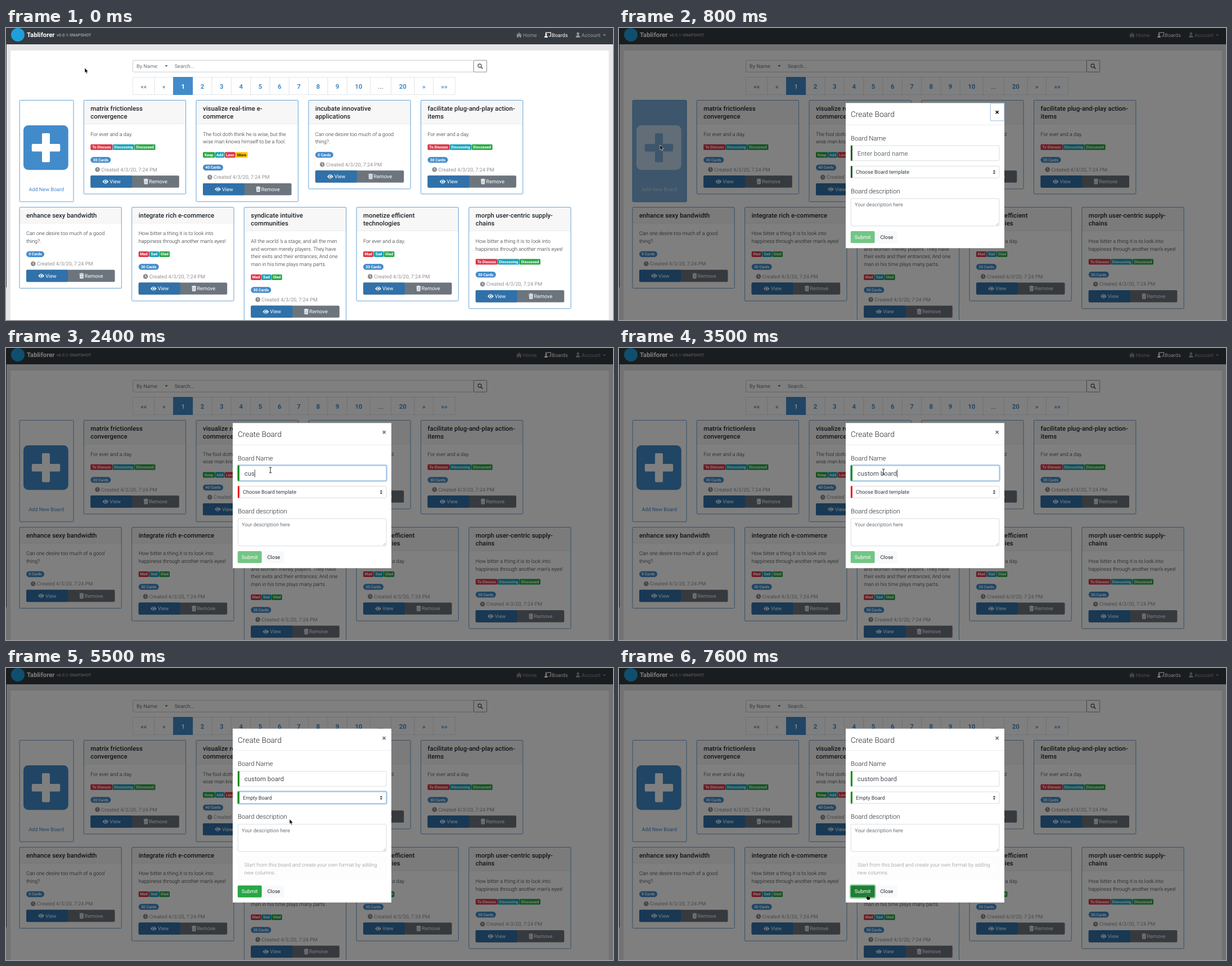
Animation, 1079 px wide and 519 px high, one loop 8000 ms. Source, as an HTML page:

```html
<!DOCTYPE html>
<html lang="en">
<head>
<meta charset="utf-8">
<title>Create a board</title>
<style>
  html, body { margin: 0; width: 100%; height: 100%; overflow: hidden; background: #e6e6e8; }
  svg { display: block; width: 1079px; height: 519px; }
  text { font-family: Roboto, sans-serif; white-space: pre; text-rendering: geometricPrecision; }
</style>
</head>
<body>
<svg viewBox="0 0 1079 519"><g id="page"></g><g id="live"></g></svg>
<script>
const BLUE = '#428bca', DEEP = '#3071a9', GRAY = '#6c757d', INK = '#212529';
const RED = '#dc3545', TEAL = '#17a2b8', GREEN = '#28a745', GOLD = '#ffc107';
const BASE = 9.11, LARGE = 11.39, SMALL = 6.83, LINE = 13.67;
const LOOP = 8000, STEP = 100;

// y is the middle of the capitals
function text(x, y, str, { size = BASE, weight = 400, fill = INK, anchor = 'start', font = '' } = {}) {
  return `<text x="${x}" y="${y + size * 0.35}" font-size="${size}" font-weight="${weight}" fill="${fill}"
    text-anchor="${anchor}"${font && ` style="font-family:${font}"`}>${str}</text>`;
}
const mid = (x, y, str, opts) => text(x, y, str, { anchor: 'middle', ...opts });
const rect = (x, y, w, h, fill, rx = 0, stroke = 'none', sw = 0.8, opacity = 1) =>
  `<rect x="${x}" y="${y}" width="${w}" height="${h}" rx="${rx}" fill="${fill}" stroke="${stroke}" stroke-width="${sw}" opacity="${opacity}"/>`;
const path = (d, fill, extra = '') => `<path d="${d}" fill="${fill}" ${extra}/>`;
const circle = (x, y, r, fill, extra = '') => `<circle cx="${x}" cy="${y}" r="${r}" fill="${fill}" ${extra}/>`;
const group = (x, y, body, opacity = 1) => `<g transform="translate(${x} ${y})" opacity="${opacity}">${body}</g>`;
const caretDown = (x, y, fill) => path(`M${x - 2.6} ${y - 1.2}h5.2l-2.6 2.7z`, fill);

const icons = {
  eye: path('M-5.3 0Q0-7.4 5.3 0Q0 7.4-5.3 0Z', '#fff') + circle(0, 0, 2.6, DEEP) + circle(0.2, 0, 1.6, '#fff'),
  trash: path('M-4-4.4h2.4l.6-.7h2l.6.7H4v1.2h-8zM-3.5-2.6h7L3 4.6h-6z', '#fff') +
    path('M-1.6-1.4v4.8M0-1.4v4.8M1.6-1.4v4.8', 'none', `stroke="${GRAY}" stroke-width=".6"`),
  clock: circle(0, 0, 4.3, '#8c8c8c') + path('M0-2.6V.3L1.8 1.7', 'none', 'stroke="#fff" stroke-width="1"'),
  home: path('M-5.2.3 0-4.2 5.2.3 4.6 1 0-3-4.6 1zM-3.6 1 0-2 3.6 1v3.4H1V1.8h-2v2.6h-2.6z', '#999c9f'),
  teacher: path('M-3.4-2v-2.2h8.8v6.6H1.6', 'none', 'stroke="#fff" stroke-width="1.1"') +
    circle(-3, -.9, 1.6, '#fff') + path('M-6 4.6c0-5 6-5 6 0z', '#fff'),
  person: circle(0, -2.2, 2.3, '#999c9f') + path('M-4 4.4C-4-1 4-1 4 4.4z', '#999c9f'),
};

const topics = [['To Discuss', 39, RED], ['Discussing', 38.4, TEAL], ['Discussed', 37, GREEN]];
const moods = [['Mad', 18.4, RED], ['Sad', 17.6, TEAL], ['Glad', 18.6, GREEN]];
const changes = [['Keep', 21.4, GREEN], ['Add', 16.6, TEAL], ['Less', 19, RED], ['More', 21.4, GOLD]];
const day = ['For ever and a day.'];
const desire = ['Can one desire too much of a good', 'thing?.'];
const bitter = ['How bitter a thing it is to look into', "happiness through another man's eyes!"];
const fool = ['The fool doth think he is wise, but the', 'wise man knows himself to be a fool.'];
const stage = ["All the world 's a stage, and all the men", 'and women merely players. They have',
  'their exits and their entrances; And one', 'man in his time plays many parts.'];
const cards = [
  [138.3, 128.4, ['matrix frictionless', 'convergence'], day, topics, 30],
  [338, 128.4, ['visualize real-time e-', 'commerce'], fool, changes, 40],
  [537.8, 128.4, ['incubate innovative', 'applications'], desire, [], 0],
  [737.5, 128.4, ['facilitate plug-and-play action-', 'items'], day, topics, 30],
  [24, 318.6, ['enhance sexy bandwidth'], desire, [], 0],
  [223.7, 318.6, ['integrate rich e-commerce'], bitter, moods, 30],
  [423.3, 318.6, ['syndicate intuitive', 'communities'], stage, moods, 30],
  [623, 318.6, ['monetize efficient', 'technologies'], day, moods, 30],
  [822.8, 318.6, ['morph user-centric supply-', 'chains'], bitter, topics, 30],
];

function card([x, top, title, quote, badges, count]) {
  const left = x + 12, headHeight = 14.3 + LINE * title.length;
  let body = rect(x, top, 181.3, headHeight, '#f7f7f7') + rect(x, top + headHeight, 181.3, 0.6, '#dfdfdf');
  title.forEach((s, i) => body += text(left, top + 14.7 + i * LINE, s, { size: LARGE, weight: 500 }));
  let y = top + 32.8 + LINE * title.length;
  quote.forEach((s, i) => body += text(left, y + i * LINE, s, { weight: 300 }));
  y += LINE * (quote.length - 1) + 23.2;
  let bx = left;
  for (const [label, w, color] of badges) {
    body += rect(bx, y - 5, w, 10, color, 1.6) +
      mid(bx + w / 2, y, label, { size: SMALL, weight: 700, fill: color === GOLD ? INK : '#fff' });
    bx += w + 0.4;
  }
  if (badges.length) y += 22.6;
  const pill = count ? 36 : 32;
  body += rect(left, y - 5.2, pill, 10.4, BLUE, 5.2) +
    mid(left + pill / 2, y, count + ' Cards', { size: SMALL, weight: 700, fill: '#fff' });
  y += 17.1;
  body += group(x + 24.3, y, icons.clock) + text(x + 31, y, 'Created 4/3/20, 7:24 PM', { fill: '#929292' });
  y += 21.5;
  body += rect(left, y - 10.7, 157.5, 21.4, GRAY, 2) + rect(left, y - 10.7, 74, 21.4, DEEP, 2) +
    group(x + 38.6, y, icons.eye) + text(x + 46, y, 'View', { fill: '#fff' }) +
    group(x + 110.4, y, icons.trash) + text(x + 115.8, y, 'Remove', { fill: '#fff' });
  return rect(x, top, 181.3, y + 22 - top, '#fff') + body + rect(x, top, 181.3, y + 22 - top, 'none', 1.5, BLUE);
}

function pagination() {
  const labels = ['««', '«', 1, 2, 3, 4, 5, 6, 7, 8, 9, 10, '...', 20, '»', '»»'];
  const edges = [225.3, 264, 297.5, 332, 366, 400.5, 434.8, 469, 503.3, 537.6, 572, 606.2, 647.5, 684.7, 726, 759.5, 798.5];
  const cells = labels.map((label, i) => {
    const x = edges[i], w = edges[i + 1] - x, plain = i < 2 || label === '...';
    return rect(x, 87.5, w, 31, '#fff', 0, '#dee2e6') +
      mid(x + w / 2, 103.7, label, { size: LARGE, weight: plain ? 500 : 700, fill: plain ? GRAY : BLUE });
  });
  return cells.join('') + rect(297, 87, 35, 32, BLUE) +
    mid(314.7, 103.7, '1', { size: LARGE, weight: 700, fill: '#fff' });
}

function page() {
  return rect(0, 0, 1079, 519, '#e6e6e8') + rect(8, 40, 1063.5, 480, '#fff') +
    rect(0, 0, 1079, 29, '#343a40') + rect(0, 28, 1, 433, '#343a40') + circle(21, 12, 12, '#1f9fdb') +
    text(37, 11.6, 'Tabliforer', { size: LARGE, weight: 700, fill: '#fff' }) +
    text(90, 12.6, 'v0.0.1-SNAPSHOT', { size: 7.29, weight: 700, fill: '#9a9da0' }) +
    group(912, 12.3, icons.home) + text(919, 12.5, 'Home', { fill: '#999c9f' }) +
    group(963, 12.3, icons.teacher) + text(970, 12.5, 'Boards', { fill: '#fff' }) +
    group(1016.7, 12.3, icons.person) + text(1023, 12.5, 'Account', { fill: '#999c9f' }) + caretDown(1063.7, 12.6, '#999c9f') +
    rect(225.4, 57.4, 606, 20.8, '#fff', 2, '#bcc1c6') + text(232, 68, 'By Name:', { fill: GRAY }) +
    caretDown(285, 67.5, '#555') + text(299.7, 68, 'Search...', { fill: GRAY }) +
    rect(831.3, 57.4, 23.3, 20.8, '#fff', 1.5, GRAY) +
    circle(842, 67, 3, 'none', 'stroke="#555c63" stroke-width="1.3"') +
    path('M844.3 69.3l3 3', 'none', 'stroke="#555c63" stroke-width="1.7"') +
    pagination() + cards.map(card).join('');
}

function addCard(front, back) {
  return rect(24.2, 128.4, 95.8, 180.4, back, 1.5, BLUE) + rect(31, 173, 79.7, 79.2, front, 8.5) +
    rect(45.8, 206, 50.4, 13.4, back, 2) + rect(64, 187, 14, 51.4, back, 2) +
    mid(71.8, 287, 'Add New Board', { fill: front });
}

// Linear value between [time, value...] keys
function track(keys, t, column = 1) {
  const i = keys.findIndex(key => key[0] > t);
  if (i === 0) return keys[0][column];
  if (i < 0) return keys[keys.length - 1][column];
  const a = keys[i - 1], b = keys[i];
  return a[column] + (b[column] - a[column]) * (t - a[0]) / (b[0] - a[0]);
}

const hoverKeys = [[300, 0], [400, .6], [500, 1], [700, 1], [800, .7], [900, 0]];
const nameFocus = [[1600, 0], [1700, .3], [1800, 1], [4000, 1], [4100, .5], [4500, .5], [4600, 0]];
const selectFocus = [[4000, 0], [4100, .5], [4500, .5], [4600, 1], [6200, 1], [6300, .5], [6400, 0]];
const areaFocus = [[6200, 0], [6300, .5], [6400, 1], [7500, 1], [7600, 0]];
const cursorKeys = [
  [200, 140, 71], [500, 70, 209], [700, 70, 209], [800, 73, 208], [1500, 470, 217], [3400, 470, 217],
  [3500, 470, 220], [3700, 470, 220], [3900, 469, 235], [4000, 469, 235], [4100, 470, 252], [4500, 470, 252],
  [4600, 503, 258], [4700, 503, 258], [5000, 504, 268.5], [5600, 504, 268.5], [5900, 507, 295], [6600, 507, 295],
  [6900, 452, 422], [7100, 441, 405], [7200, 441, 405], [7300, 441, 403],
];
const shapes = {
  arrow: path('M0 0V8.6L2 6.9 3.4 10.2 4.9 9.5 3.5 6.4H6.2Z', '#000', 'stroke="#fff" stroke-width=".6"'),
  beam: path('M-2.4-5Q0-5 0-3.6Q0-5 2.4-5M0-4V4M-2.4 5Q0 5 0 3.6Q0 5 2.4 5', 'none', 'stroke="#222" stroke-width="1"'),
  hand: path('M-.6.5Q.4-.5 1.2.5V3L5 4.1Q5.7 4.5 5.4 6L4.6 9H.2L-2 5.2Q-1.6 4-.6 5Z', '#000', 'stroke="#fff" stroke-width=".4"'),
};
const cursorKinds = [[7300, 'hand'], [6700, 'arrow'], [5900, 'beam'], [3900, 'arrow'], [1500, 'beam'], [800, 'arrow'], [500, 'hand'], [0, 'arrow']];

function cursor(t) {
  const [, kind] = cursorKinds.find(([start]) => t >= start);
  return group(track(cursorKeys, t), track(cursorKeys, t, 2), shapes[kind]);
}

function field(y, h, focus, bar) {
  return rect(411.3, y - .9, 265.7, h + 1.8, 'none', 3, BLUE, 2, focus * .4) +
    rect(412.3, y, 263.7, h, '#fff', 2, '#ced4da') +
    rect(412.3, y, 263.7, h, 'none', 2, '#80bde8', .8, focus) +
    (bar ? rect(411.9, y - .3, 3, h + .6, bar, .8) : '');
}

const pen = document.createElement('canvas').getContext('2d');
pen.font = `${LARGE}px Roboto, sans-serif`;
const NAME = 'custom board';

function suggestions() {
  const rows = ['went well something', 'test', 'empty'];
  return rect(412, 237.4, 109, 70, '#000', 1, 'none', 0, .16) + rect(412, 237, 108.7, 69.6, '#fff', 1, '#d5d5d5', .6) +
    rows.map((s, i) => text(418.7, 251.6 + i * 20.4, s, { size: 8.4, fill: '#222', font: 'Noto Sans, sans-serif' })).join('');
}

function options(t) {
  const rows = ['Empty Board', 'Mad Sad Glad', 'Keep Add Less More', 'Discussion', 'Went Well', 'Start Stop', 'Plus Delta'];
  const shown = t < 4600 ? 1 : rows.length;
  const height = t < 4600 ? 22.5 : 100.5;
  return rect(412.3, 267, 263.7, height, '#fff', 0, '#b5b5b5') +
    (t >= 4900 ? rect(412.7, 267.4, 263, 13, '#d5dbe2') : '') +
    rows.slice(0, shown).map((s, i) => text(421, 274 + i * 14.1, s)).join('');
}

function modal(t) {
  const chosen = t >= 5200, typed = t < 2200 ? 0 : t < 3500 ? Math.min(5, 1 + (t - 2200) / STEP) : NAME.length;
  const name = NAME.slice(0, typed), grow = chosen ? 51 : 0;
  const bar = ok => t < 900 ? '#1b5e20' : ok ? '#008a00' : '#f01018';
  const buttonY = 371.7 + grow, caret = (x, y) => rect(x, y - 6.8, .8, 13.6, '#222');
  let out = rect(403, 133.3, 282, 258 + grow, '#fff') + rect(403, 171.8, 282, .7, '#e3e6e9');
  if (t < 1600) out += rect(660.2, 134, 24.6, 30.8, '#fff', 1, '#9db9e6', 1);
  out += text(412, 153.3, 'Create Board', { size: 13.67, weight: 300 }) +
    mid(672.3, 149.6, '×', { size: 13, weight: 700, fill: t < 1600 ? '#000' : '#666' }) +
    text(412, 196, 'Board Name', { size: LARGE, weight: 300 }) +
    field(209, 26.8, track(nameFocus, t), bar(typed)) +
    text(423.8, 223, name || 'Enter board name', { size: LARGE, fill: name ? '#495057' : GRAY }) +
    field(245.5, 20.8, track(selectFocus, t), bar(chosen)) +
    text(421, 256.2, chosen ? 'Empty Board' : 'Choose Board template', { fill: '#343a40' }) +
    path('M664.6 255.2h4.6l-2.3-2.8zM664.6 257h4.6l-2.3 2.8z', '#343a40') +
    text(412, 290, 'Board description', { size: LARGE, weight: 300 }) +
    field(303.2, 48.6, track(areaFocus, t)) + text(419, 314.2, 'Your description here', { fill: GRAY }) +
    path('M670.5 350.5l4-4M673 350.5l1.6-1.6', 'none', 'stroke="#777" stroke-width=".6"');
  if (t >= 1600 && t < 4100) out += caret(423.8 + pen.measureText(name).width, 223);
  if (t >= 6400 && t < 6700) out += caret(419, 314);
  if (chosen) {
    const hint = { weight: 300, fill: '#8c8c8c' };
    out += group(0, 0, rect(412.3, 360.6, 263.7, 41, '#fdfdfd', 1.5, '#f8f8f8') +
      text(423.7, 375.7, 'Start from this board and create your own format by adding', hint) +
      text(423.7, 389.2, 'new columns.', hint), track([[5100, .2], [5500, 1]], t));
  }
  if (t >= 7600) out += rect(410.9, buttonY - 11.7, 44.7, 23.4, 'none', 3, GREEN, 2, .5);
  const submitColor = !chosen ? '#73c585' : t >= 7600 ? '#1e7e34' : t >= 7300 ? '#218838' : GREEN;
  out += rect(411.8, buttonY - 10.6, 42.8, 21.2, submitColor, 2) + mid(433.2, buttonY, 'Submit', { fill: '#fff' }) +
    rect(457.5, buttonY - 10.6, 37, 21.2, '#f8f9fa', 2) + mid(476, buttonY, 'Close');
  if (t >= 1700 && t < 2200) out += suggestions();
  if (t >= 4100 && t < 5200) out += options(t);
  return group(0, chosen ? -25.5 : 0, out);
}

function scene(t) {
  const hover = track(hoverKeys, t);
  let out = addCard(BLUE, '#fff') + group(0, 0, addCard('#fff', BLUE), hover);
  if (t >= 800) out += rect(0, 0, 1079, 519, '#000', 0, 'none', 0, .5) + modal(t);
  return out + cursor(t);
}

const live = document.getElementById('live');
document.getElementById('page').innerHTML = page();
let shownAt = -1;
function tick() {
  const t = Math.floor(performance.now() % LOOP / STEP) * STEP;
  if (t !== shownAt) live.innerHTML = scene(shownAt = t);
  requestAnimationFrame(tick);
}
tick();
</script>
</body>
</html>
```
